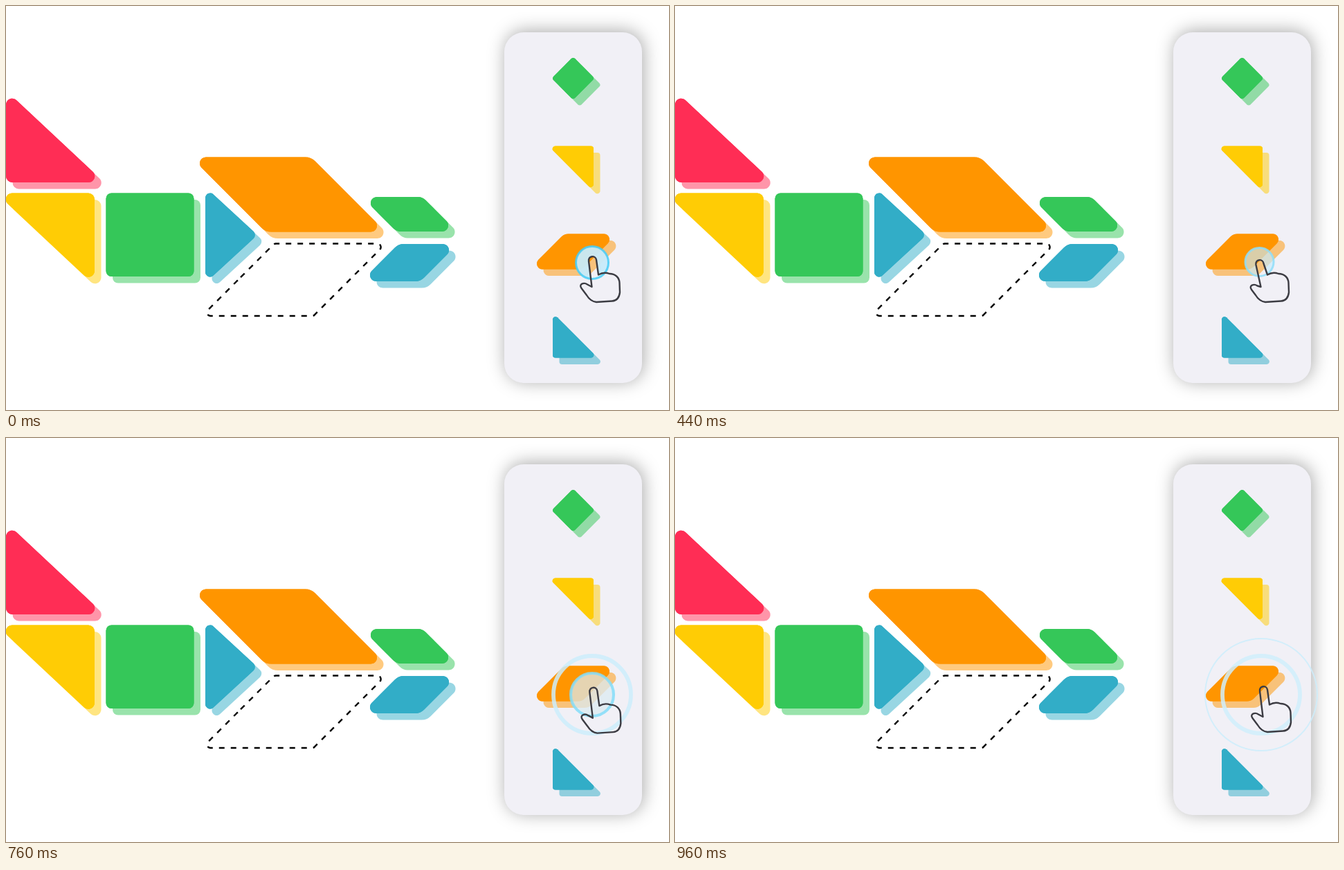
Animation of 958x584 px, one loop 1 s. Source, as an HTML page with a canvas:

```html
<!DOCTYPE html>
<html lang="en">
<head>
<meta charset="utf-8">
<title>Tangram drag</title>
<style>
  html, body { margin: 0; width: 100%; height: 100%; overflow: hidden; background: #fff; }
  canvas { display: block; }
</style>
</head>
<body>
<canvas id="stage" width="958" height="584"></canvas>
<script>
const ctx = document.getElementById('stage').getContext('2d');
const LOOP = 1000, STEP = 40, HOLD = 80, RELEASE = 600;
const RED = '#ff2d55', YELLOW = '#ffcc05', GREEN = '#35c759', BLUE = '#32adc7', ORANGE = '#ff9500';
const TAP = { x: 847, y: 371 };

// Each corner is [x, y, radius].
function roundPoly(pts) {
  const path = new Path2D();
  const [a, b] = [pts[pts.length - 1], pts[0]];
  path.moveTo((a[0] + b[0]) / 2, (a[1] + b[1]) / 2);
  pts.forEach(([x, y, r], i) => {
    const next = pts[(i + 1) % pts.length];
    path.arcTo(x, y, next[0], next[1], r);
  });
  path.closePath();
  return path;
}

// Right triangle: square corner at x, y with signed legs.
const wedge = (x, y, dx, dy, r) => roundPoly([[x, y, r], [x + dx, y, r], [x, y + dy, r]]);

// Triangle standing on its long side, pointing right.
const arrow = (x, cy, half, r) =>
  roundPoly([[x, cy - half, r], [x + half * 1.08, cy, r], [x, cy + half, r]]);

const diamond = (cx, cy, d, r) =>
  roundPoly([[cx, cy - d, r], [cx + d, cy, r], [cx, cy + d, r], [cx - d, cy, r]]);

function block(x, y, w, h, r) {
  const path = new Path2D();
  path.roundRect(x, y, w, h, r);
  return path;
}

// 45 degree parallelogram; lean 1 slides the bottom edge right, -1 left.
function slant(cx, cy, w, h, lean, sharp, blunt) {
  const s = lean * h / 2, [p, q] = lean > 0 ? [sharp, blunt] : [blunt, sharp];
  const left = cx - w / 2, right = cx + w / 2, top = cy - h / 2, bottom = cy + h / 2;
  return roundPoly([[left - s, top, p], [right - s, top, q], [right + s, bottom, p], [left + s, bottom, q]]);
}

const board = [
  [RED, wedge(0, 255, 142, -133, 9)],
  [YELLOW, wedge(128, 270.5, -142, 133, 9)],
  [GREEN, block(144.5, 270.5, 127, 120.5, 8)],
  [BLUE, arrow(288, 331, 69.5, 7)],
  [ORANGE, slant(408, 272.5, 173.5, 108, 1, 9, 20)],
  [GREEN, slant(583, 301, 87.5, 50, 1, 9, 16)],
  [BLUE, slant(583, 371, 85.5, 54, -1, 9, 18)]
];

const tray = [
  [GREEN, diamond(819.5, 104.5, 31, 4)],
  [YELLOW, wedge(849, 202.5, -65, 65, 4)],
  [ORANGE, slant(819.5, 355, 76.5, 51, -1, 8, 14)],
  [BLUE, wedge(790, 508.5, 65, -65, 4)]
];

const slot = slant(416, 395.75, 161, 104.5, -1, 5, 5);
const panel = block(720, 38, 199, 507, 28);

function drawPiece([color, path]) {
  ctx.save();
  ctx.fillStyle = color;
  ctx.fill(path);
  ctx.translate(9.5, 9.5);
  ctx.globalAlpha = 0.5;
  ctx.fill(path);
  ctx.restore();
  ctx.fillStyle = color;
  ctx.fill(path);
}

function drawPanel() {
  ctx.save();
  ctx.shadowColor = 'rgba(0,0,0,.34)';
  ctx.shadowBlur = 26;
  ctx.shadowOffsetX = 2;
  ctx.shadowOffsetY = -2;
  ctx.fillStyle = '#f1f0f6';
  ctx.fill(panel);
  ctx.restore();
}

function drawSlot() {
  ctx.save();
  ctx.strokeStyle = '#000';
  ctx.lineWidth = 2.4;
  ctx.setLineDash([8, 9]);
  ctx.lineDashOffset = -5;
  ctx.stroke(slot);
  ctx.restore();
}

const ramp = (t, a, b) => Math.min(1, Math.max(0, (t - a) / (b - a)));
const smooth = k => k * k * (3 - 2 * k);

// press bends the index finger; drift carries the whole hand up and right.
function handPath(press, drift) {
  const path = new Path2D();
  const shift = (dx, dy) => (x, y) => [x + drift + dx * press, y - drift + dy * press];
  const palm = shift(0, 0), tip = shift(-2.6, 5), thumb = shift(1.5, 2);
  const curve = (a, b, c) => path.bezierCurveTo(...a, ...b, ...c);
  path.moveTo(...tip(842, 369));
  curve(tip(841, 360.5), tip(852, 360), tip(853, 367));
  path.lineTo(...palm(856, 388.5));
  curve(palm(861, 385.5), palm(867, 385), palm(872, 387));
  curve(palm(880, 387), palm(886, 392), palm(886.5, 400));
  path.lineTo(...palm(887, 414));
  curve(palm(886, 422), palm(882, 426), palm(876, 426.5));
  path.lineTo(...palm(853, 428));
  curve(palm(846, 427), palm(842, 423), palm(839, 418));
  path.lineTo(...thumb(831.5, 408));
  curve(thumb(827, 402), thumb(835, 399), thumb(840, 402.5));
  path.lineTo(...palm(846.5, 406));
  path.closePath();
  return path;
}

function circle(x, y, r) {
  const path = new Path2D();
  path.arc(x, y, r, 0, Math.PI * 2);
  return path;
}

function ring(x, y, r, width, color, alpha) {
  ctx.globalAlpha = alpha;
  ctx.strokeStyle = color;
  ctx.lineWidth = width;
  ctx.stroke(circle(x, y, r));
  ctx.globalAlpha = 1;
}

function disc(x, y, r, color, alpha) {
  ctx.globalAlpha = alpha;
  ctx.fillStyle = color;
  ctx.fill(circle(x, y, r));
  ctx.globalAlpha = 1;
}

// Fills the touch dot everywhere except inside the hand outline.
function dotAround(hand, x, y, r, alpha) {
  const mask = block(0, 0, 958, 584, 0);
  mask.addPath(hand);
  ctx.save();
  ctx.clip(mask, 'evenodd');
  disc(x, y, r, '#c8ebfb', alpha);
  ctx.restore();
}

// Ripple lines swell towards r = 50 and thin out again.
const rippleWidth = r => 6 * Math.sin(Math.PI * r / 100) ** 2;

function drawTap(t) {
  const press = smooth(ramp(t, HOLD, 200)) * (1 - smooth(ramp(t, 460, RELEASE)));
  const fade = ramp(t, 0, RELEASE);
  const pulse = Math.sin(Math.PI * ramp(t, 620, 880)) ** 2;
  const hand = handPath(press, 3 * ramp(t, RELEASE, 960));
  const x = TAP.x - 2.5 * press, y = TAP.y - press;

  const wave = 31 + (t - 760) / 8;
  const inner = Math.max(23.5 - 5.5 * fade ** 2, wave);
  const outer = Math.max(0, wave + 25);
  ring(TAP.x, TAP.y, outer, rippleWidth(outer), '#cdeefc', 0.85 * ramp(t, 560, 760));

  dotAround(hand, x, y, inner, 0.95 * (1 - fade ** 4));
  disc(x, y, inner, '#dcebf2', 0.75 * pulse);
  const pale = fade ** 2 * (1 - 0.55 * pulse);
  const color = `rgb(${70 + 138 * pale},${205 + 34 * pale},${247 + 5 * pale})`;
  ring(x, y, inner, Math.max(3, rippleWidth(inner)), color, 0.85);

  ctx.strokeStyle = '#3c3c43';
  ctx.lineWidth = 2.4;
  ctx.lineJoin = 'round';
  ctx.stroke(hand);
}

function draw(t) {
  ctx.fillStyle = '#fff';
  ctx.fillRect(0, 0, 958, 584);
  board.forEach(drawPiece);
  drawSlot();
  drawPanel();
  tray.forEach(drawPiece);
  drawTap(t);
}

function tick() {
  const t = performance.now() % LOOP;
  draw(t < HOLD ? 0 : Math.floor(t / STEP) * STEP);
  requestAnimationFrame(tick);
}
tick();
</script>
</body>
</html>
```
